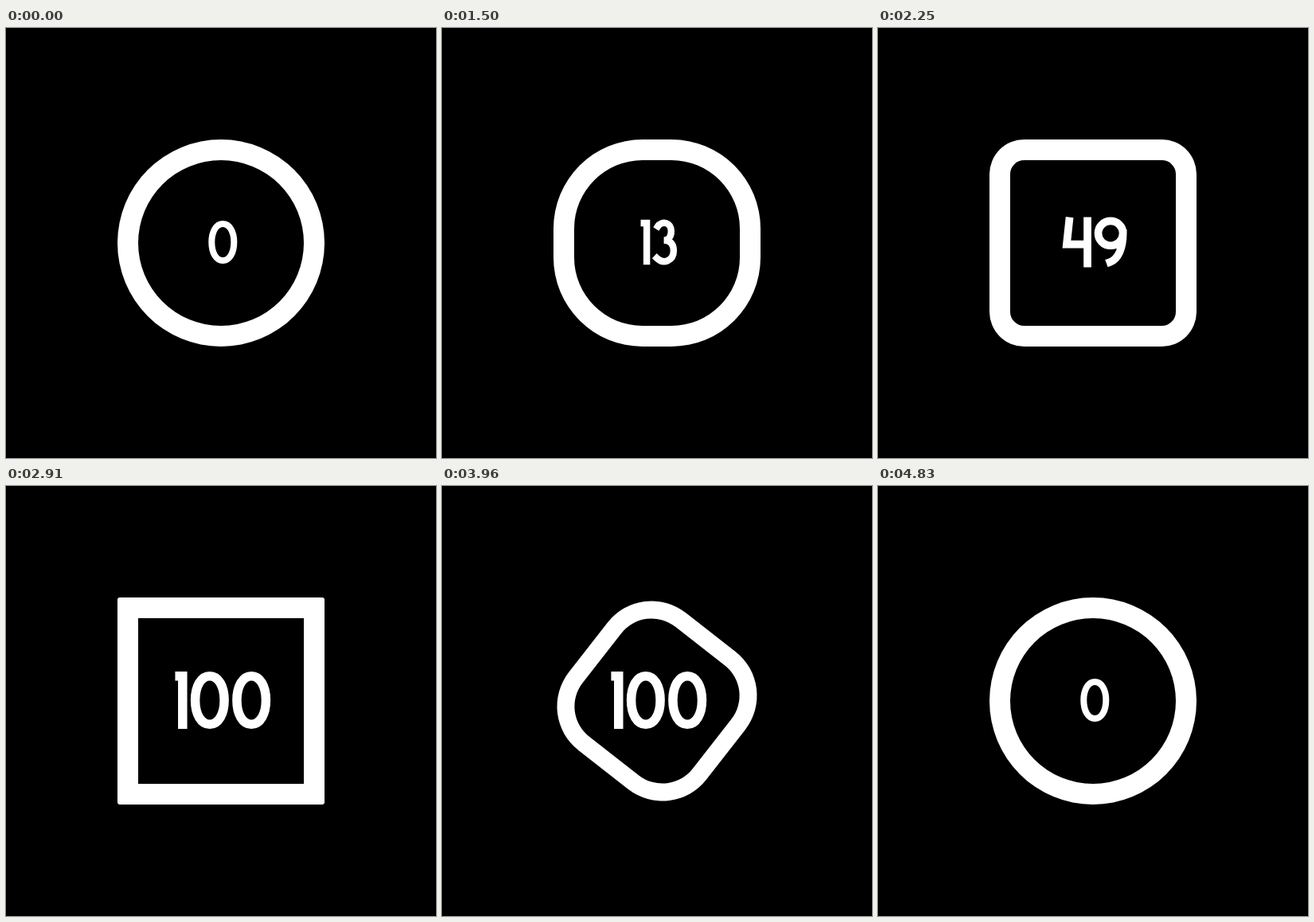
These frames come from a looping animation (540 by 540 pixels, 5400 ms). An HTML page with a canvas:

```html
<!DOCTYPE html>
<html lang="en">
<head>
<meta charset="utf-8">
<title>Counter</title>
<style>
  html, body { margin: 0; width: 100%; height: 100%; overflow: hidden; background: #000; }
  canvas { display: block; width: 540px; height: 540px; }
</style>
</head>
<body>
<canvas id="stage" width="540" height="540" role="img"></canvas>
<script>
const LOOP = 5400, STEP = 30;
const HALF = 130, BORDER = 26;
const SMALLEST = 0.728;

const canvas = document.getElementById('stage');
const ctx = canvas.getContext('2d');

// Each numeral: width relative to its height, and a centre line in a 100 x 100 box.
const NUMERALS = [
  [0.667, 'M50 0C80 0 100 21 100 50S80 100 50 100 0 79 0 50 20 0 50 0Z'],
  [0.21, 'M0 0H100V100'],
  [0.57, 'M2 20C6 -6 96 -10 96 26C96 50 40 74 4 100H100'],
  [0.54, 'M10 8C30 -6 86 -4 86 21C86 37 66 45 44 45C76 45 100 53 100 72C100 98 44 110 4 92'],
  [0.57, 'M12 0L0 55H100M100 0V100'],
  [0.57, 'M92 0H22L12 42C50 30 100 40 100 68C100 98 50 110 2 92'],
  [0.65, 'M50 100C22 100 0 87 0 71S22 42 50 42 100 55 100 71 78 100 50 100ZM0 71C0 35 20 10 52 3'],
  [0.57, 'M0 0H100L34 100'],
  [0.6, 'M50 0C74 0 90 10 90 23S74 45 50 45 10 36 10 23 26 0 50 0ZM50 45C78 45 100 56 100 73S78 100 50 100 0 90 0 73 22 45 50 45Z'],
  [0.65, 'M50 0C78 0 100 13 100 29S78 58 50 58 0 45 0 29 22 0 50 0ZM100 29C100 65 80 90 48 97']
].map(([width, line]) => ({ width, path: new Path2D(line) }));

// Cubic Bézier easing with level handles at x = a and x = b.
function ease(x, a, b) {
  if (x <= 0) return 0;
  if (x >= 1) return 1;
  let low = 0, high = 1;
  for (let i = 0; i < 30; i++) {
    const s = (low + high) / 2, r = 1 - s;
    if (3 * r * r * s * a + 3 * r * s * s * b + s ** 3 < x) low = s;
    else high = s;
  }
  return low * low * (3 - 2 * low);
}

const progress = (t, start, end, a = 1, b = 1 / 3) =>
  ease((t - start) / (end - start), a, b);

function drawRing(radius, scale, angle) {
  const inner = HALF - BORDER;
  ctx.save();
  ctx.translate(270, 270);
  ctx.rotate(angle);
  ctx.scale(scale, scale);
  ctx.beginPath();
  ctx.roundRect(-HALF, -HALF, 2 * HALF, 2 * HALF, radius);
  ctx.roundRect(-inner, -inner, 2 * inner, 2 * inner, Math.max(0, radius - BORDER));
  ctx.fill('evenodd');
  ctx.restore();
}

function drawCount(amount) {
  const text = String(Math.round(100 * amount));
  const height = 54 + 18 * amount;
  const pen = 8 + 3.5 * amount;
  const gap = 0.06 * height;
  const glyphs = [...text].map(c => NUMERALS[c]);
  const total = glyphs.reduce((sum, g) => sum + g.width * height, gap * (glyphs.length - 1));
  let x = 272.3 - total / 2;
  ctx.lineWidth = pen;
  ctx.lineCap = 'square';
  ctx.miterLimit = 4;
  for (const { width, path } of glyphs) {
    const w = width * height;
    const placed = new Path2D();
    placed.addPath(path, new DOMMatrix([
      (w - pen) / 100, 0, 0, (height - pen) / 100,
      x + pen / 2, 269 - (height - pen) / 2
    ]));
    ctx.stroke(placed);
    x += w + gap;
  }
  canvas.setAttribute('aria-label', text);
}

function draw(now) {
  const t = Math.floor((now % LOOP) / STEP) * STEP;
  ctx.fillStyle = '#000';
  ctx.fillRect(0, 0, 540, 540);
  ctx.fillStyle = ctx.strokeStyle = '#fff';

  const square = progress(t, 60, 3330, 0.9, 0.44);
  const round = progress(t, 3600, 4143, 0.9, 0.44);
  const turn = progress(t, 3600, 4165);
  const grow = progress(t, 4165, 4840);
  drawRing(
    HALF * (1 - square + square * round),
    1 - (1 - SMALLEST) * (turn - grow),
    -turn * Math.PI / 2
  );
  drawCount(t < 4170 ? progress(t, 60, 2995, 1, 2 / 3) : 0);
  requestAnimationFrame(draw);
}
requestAnimationFrame(draw);
</script>
</body>
</html>
```
